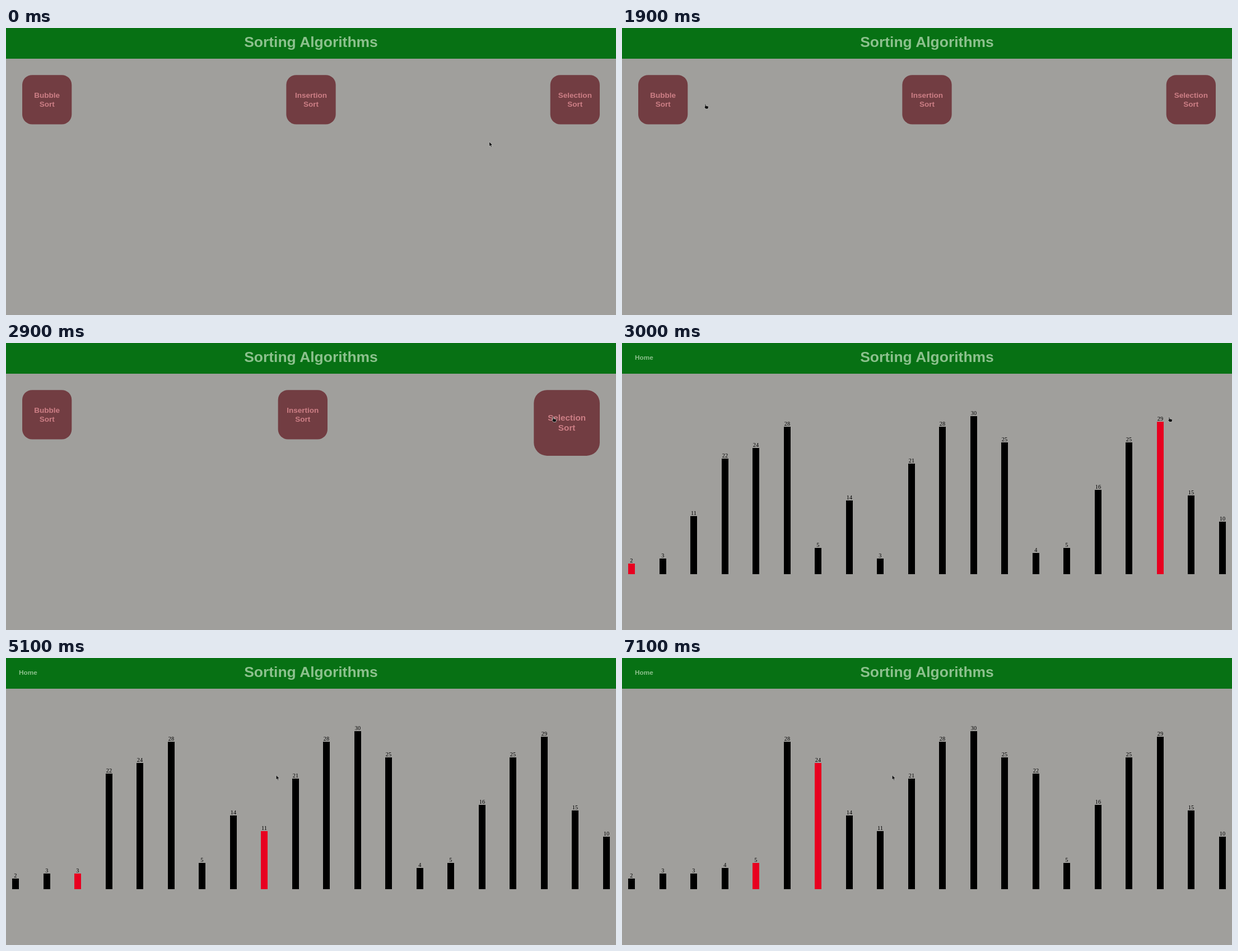
An HTML page for the animation above (8000 ms loop, 1089x514 px).

```html
<!DOCTYPE html>
<html>
<head>
<meta charset="utf-8">
<title>Sorting Algorithms</title>
<style>
  html, body { margin: 0; width: 100%; height: 100%; overflow: hidden; background: #a09f9c; }
  svg { display: block; width: 1089px; height: 514px; }
  text { font-family: "Liberation Sans", Arial, sans-serif; font-weight: bold; text-anchor: middle; fill: #8cc18d; }
  .button rect { fill: #723d42; }
  .button text { fill: #cd7f86; }
  .bar text { font: 10.3px "Liberation Serif", "Times New Roman", serif; fill: #000; }
  .bar.active rect { fill: #e80020; }
  .cursor { fill: #111; stroke: #c4c4c2; stroke-width: .8; stroke-linejoin: round; }
</style>
</head>
<body>
<svg viewBox="0 0 1089 514">
  <rect width="1089" height="55" fill="#077114"/>
  <text x="544.5" y="34.4" font-size="26.48">Sorting Algorithms</text>
  <g id="scene"></g>
</svg>
<script>
const LOOP = 8000, STEP = 100, HOVER_TIME = 500;
const scene = document.getElementById('scene');

// Pointer moves: start, end, destination x, y
const moves = [
  [0, 0, 862, 203], [700, 1000, 590, 167], [1100, 1200, 505, 150.5],
  [1200, 1500, 108, 135], [1600, 1900, 146, 135], [1900, 2000, 597, 150],
  [2000, 2200, 1074, 163], [2300, 2700, 974, 131.5], [3200, 3500, 366, 217],
  [4000, 4100, 373, 209.5], [4100, 4500, 481.5, 209]
];
const buttons = [
  { name: 'Bubble', enter: 1450, leave: 1600 },
  { name: 'Insertion', enter: 1150, leave: 1250 },
  { name: 'Selection', enter: 2350, leave: LOOP }
];
const passTimes = [3000, 4000, 5100, 6200, 7100];
const values = [29, 3, 11, 22, 24, 28, 5, 14, 3, 21, 28, 30, 25, 4, 5, 16, 25, 2, 15, 10];

const clamp = v => Math.min(1, Math.max(0, v));
const ease = v => 1 - (1 - clamp(v) ** 1.4) ** 3;

// Growth reverses in proportion to how far it got
function growth({ enter, leave }, t) {
  const peak = ease((Math.min(t, leave) - enter) / HOVER_TIME);
  return t > leave ? peak * (1 - ease((t - leave) / (HOVER_TIME * peak))) : peak;
}

function drawButtons(t) {
  const grow = buttons.map(b => growth(b, t));
  const size = grow.map(g => 88.3 + 29.4 * g);
  const left = [29, 544.5 + (size[0] - size[2] - size[1]) / 2, 1060 - size[2]];
  return buttons.map(({ name }, i) => {
    const s = size[i], x = left[i] + s / 2, y = 84.2 + s / 2, font = 13.53 + 1.77 * grow[i];
    return `<g class="button" font-size="${font}">
      <rect x="${left[i]}" y="84.2" width="${s}" height="${s}" rx="${s * .2}"/>
      <text x="${x}" y="${y - .244 * font}">${name}</text>
      <text x="${x}" y="${y + .905 * font}">Sort</text></g>`;
  }).join('');
}

// Selection sort: each pass swaps the smallest remaining value into place
function sortState(t) {
  const list = values.slice();
  let active = [];
  passTimes.filter(time => t >= time).forEach((_, i) => {
    const min = list.indexOf(Math.min(...list.slice(i)), i);
    [list[i], list[min]] = [list[min], list[i]];
    active = min === i ? [] : [i, min];
  });
  return { list, active };
}

function drawBars(t) {
  const { list, active } = sortState(t);
  return '<text x="39.4" y="30" font-size="11.77">Home</text>' + list.map((v, i) => {
    const x = Math.round(11.1 + i * 55.52), y = Math.round(413.9 - v * 9.417);
    return `<g class="bar ${active.includes(i) ? 'active' : ''}">
      <rect x="${x}" y="${y}" width="12" height="${414 - y}"/>
      <text x="${x + 5.9}" y="${y - 2}">${v}</text></g>`;
  }).join('');
}

function drawCursor(t) {
  let x = 0, y = 0;
  for (const [start, end, toX, toY] of moves) {
    const f = t >= end ? 1 : clamp((t - start) / (end - start));
    x += (toX - x) * f;
    y += (toY - y) * f;
  }
  const hand = t >= 1200 && t < 2000 || t >= 2400 && t < 3300;
  const shape = hand
    ? 'M2 1.2Q3 .2 3.8 1.2V4L7.6 5Q8.6 5.4 8.4 7L7.6 10H3.4L.8 6.8Q.8 5.6 2 6Z'
    : 'M.6 .6V9.2L2.6 7.4L4 10.6L5.5 9.9L4.2 6.9H7Z';
  return `<path class="cursor" transform="translate(${x} ${y})" d="${shape}"/>`;
}

let shown = -1;
function frame() {
  const t = Math.floor(performance.now() % LOOP / STEP) * STEP;
  if (t !== shown) {
    shown = t;
    scene.innerHTML = (t < passTimes[0] ? drawButtons(t) : drawBars(t)) + drawCursor(t);
  }
  requestAnimationFrame(frame);
}
frame();
</script>
</body>
</html>
```
